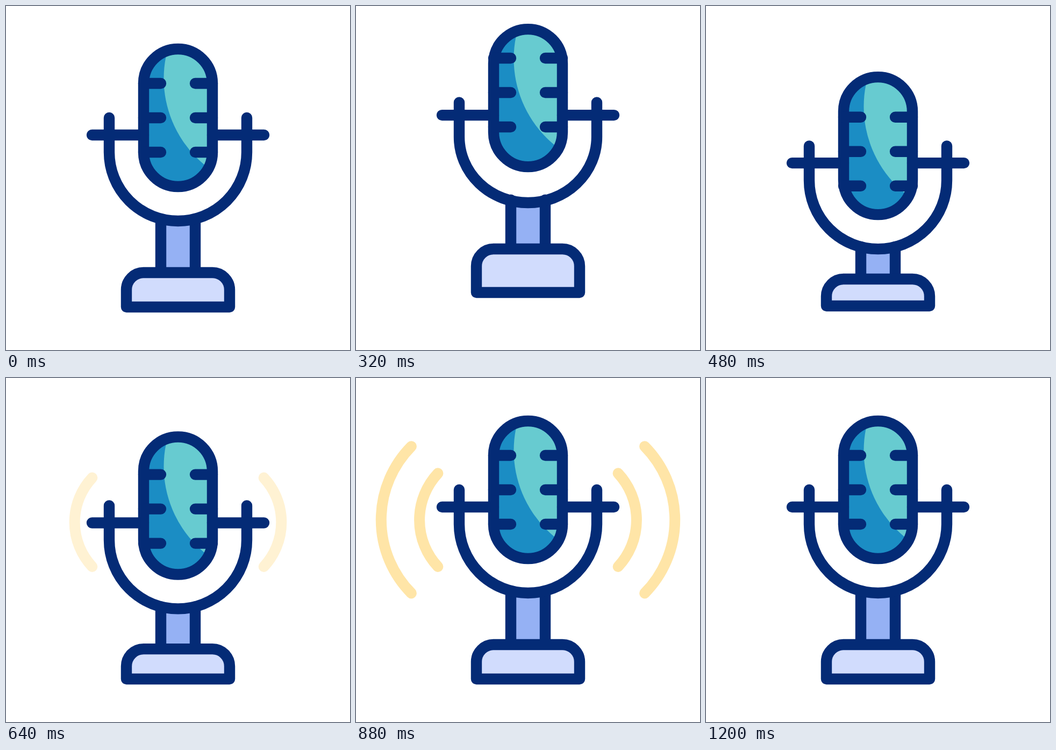
An HTML page that plays this animation: 640x640 px, repeating every 1.48 s.

```html
<!DOCTYPE html>
<html lang="en">
<head>
<meta charset="utf-8">
<title>Microphone</title>
<style>
  html, body { margin: 0; width: 100%; height: 100%; overflow: hidden; background: #fff; }
  svg { display: block; width: 100%; height: 100%; }
  .line { fill: none; stroke: #042b76; stroke-width: 20.4; stroke-linecap: round; stroke-linejoin: round; }
  .wave { fill: none; stroke: #ffe5a7; stroke-width: 20; stroke-linecap: round; }
</style>
</head>
<body>
<svg viewBox="0 0 640 640">
  <defs>
    <clipPath id="capsule"><rect x="256" y="80" width="128" height="256" rx="64"/></clipPath>
  </defs>
  <path id="innerWave" class="wave"/>
  <path id="outerWave" class="wave"/>
  <path id="postFill" fill="#95b1f4"/>
  <path id="post" class="line"/>
  <path id="base" class="line" style="fill:#d1dcfd"/>
  <path id="cradle" class="line"/>
  <g id="head">
    <g clip-path="url(#capsule)">
      <rect x="256" y="80" width="128" height="256" fill="#1b8dc4"/>
      <circle cx="501.5" cy="135" r="208" fill="#67cbd0"/>
    </g>
    <path class="line" d="M160 240H256M384 240H480"/>
    <rect class="line" x="256" y="80" width="128" height="256" rx="64"/>
  </g>
  <path id="ticks" class="line" d="M256 144h32m64 0h32M256 208h32m64 0h32M256 272h32m64 0h32"/>
</svg>
<script>
const LOOP = 1480, STEP = 40;
const el = id => document.getElementById(id);
const clamp = x => Math.min(1, Math.max(0, x));
const progress = (t, from, to) => clamp((t - from) / (to - from));
const ease = p => (1 - Math.cos(Math.PI * p)) / 2;
const mix = (a, b, p) => a + (b - a) * p;

// Vertical offset: rest, leap, landing, rest
function bounce(t, up, down) {
  if (t < 280) return up * ease(progress(t, 80, 280));
  if (t < 520) return mix(up, down, ease(progress(t, 280, 520)));
  return down * (1 - ease(progress(t, 520, 760)));
}

function drawMic(t) {
  const head = bounce(t, -43.8, 59);
  const cradleTop = bounce(t, -34.7, 58.8);
  const cradleLow = 400 + bounce(t, -40.7, 58.8);
  const postTop = 396 + bounce(t, -42, 58.8);
  const top = 496 + bounce(t, -48.3, 16.3);
  const bottom = 560 + bounce(t, -29, 0);
  const bend = 272 + cradleTop;

  el('head').setAttribute('transform', `translate(0 ${head})`);
  el('ticks').setAttribute('transform', `translate(0 ${bounce(t, -55.5, 71.2)})`);
  el('cradle').setAttribute('d',
    `M192 ${208 + cradleTop}V${bend}A128 ${cradleLow - bend} 0 0 0 448 ${bend}V${208 + cradleTop}`);
  el('postFill').setAttribute('d', `M288 ${postTop}H352V${top}H288Z`);
  el('post').setAttribute('d', `M288 ${postTop}V${top}M352 ${postTop}V${top}`);
  el('base').setAttribute('d',
    `M224 ${bottom}V${top + 32}a32 32 0 0 1 32 -32H384a32 32 0 0 1 32 32V${bottom}Z`);
}

function drawWave(id, t, w) {
  const grow = ease(progress(t, w.start, w.end));
  const s = 1 + w.growth * grow;
  const x = w.x * s, r = w.r * s;
  const y1 = w.pivot + (w.y1 - w.pivot) * s;
  const y2 = w.pivot + (w.y2 - w.pivot) * s;
  const alpha = Math.min(progress(t, w.start, w.start + 240), 1 - progress(t, w.end - 240, w.end));
  el(id).setAttribute('d',
    `M${320 - x} ${y1}A${r} ${r} 0 0 0 ${320 - x} ${y2}` +
    `M${320 + x} ${y1}A${r} ${r} 0 0 1 ${320 + x} ${y2}`);
  el(id).setAttribute('opacity', alpha);
}

const inner = { start: 520, end: 1120, growth: 0.09, pivot: 351, x: 158.3, r: 120, y1: 187, y2: 351 };
const outer = { start: 640, end: 1200, growth: 0.087, pivot: 376, x: 210, r: 188, y1: 135.3, y2: 399.6 };

function render(ms) {
  const t = Math.floor((ms % LOOP) / STEP) * STEP;
  drawMic(t);
  drawWave('innerWave', t, inner);
  drawWave('outerWave', t, outer);
}

const begin = performance.now();
function tick() {
  render(performance.now() - begin);
  requestAnimationFrame(tick);
}
tick();
</script>
</body>
</html>
```
